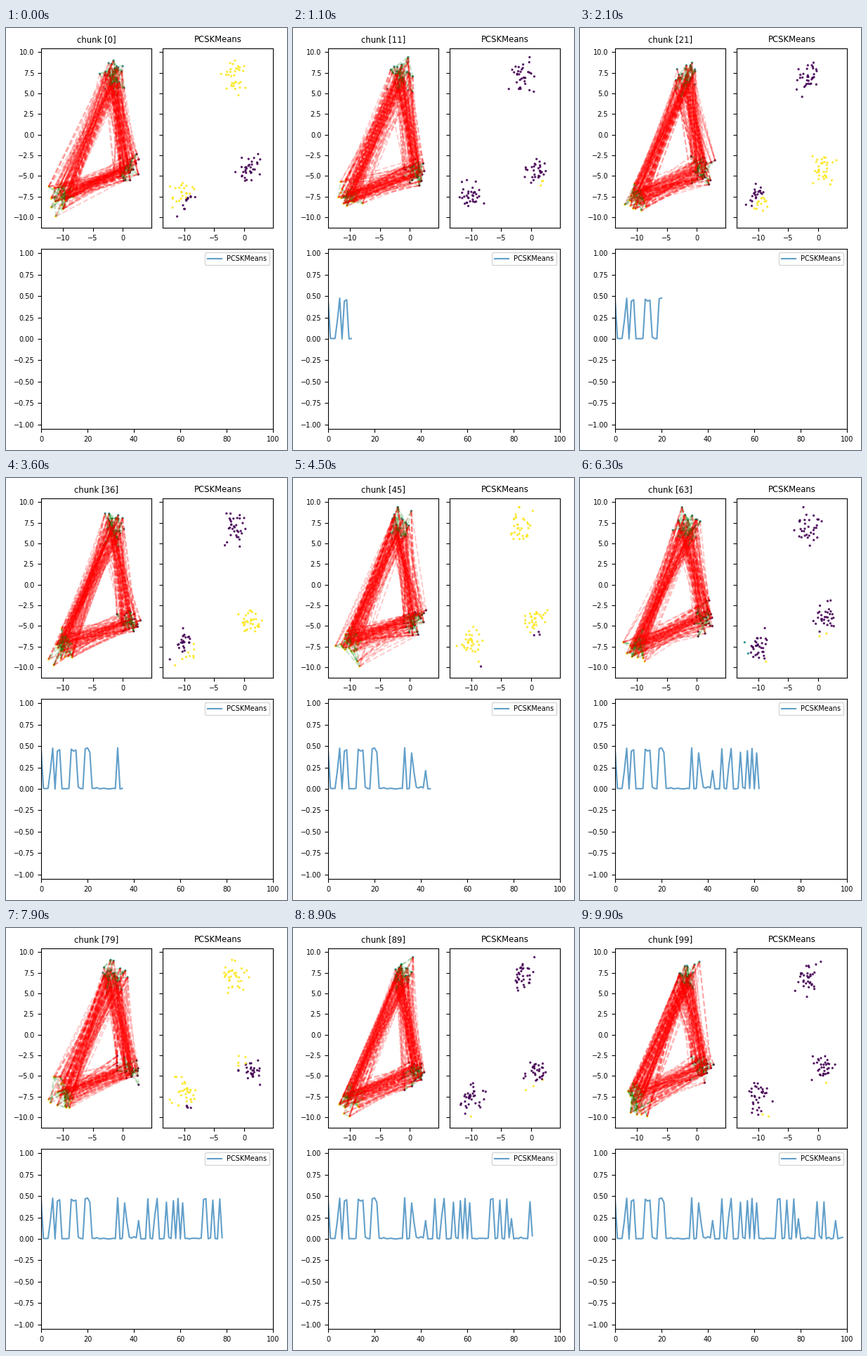
Recreate the animation shown at these times as a matplotlib script. Size 400 by 600 pixels, loop 10000 ms.

```python
import numpy as np
import matplotlib.pyplot as plt
from matplotlib.animation import FuncAnimation
from matplotlib.collections import LineCollection

plt.rcParams.update({"font.size": 7, "font.family": "DejaVu Sans"})

CHUNKS, LINKS = 100, 500
CENTERS = np.array([(0.85, -4.3), (-1.6, 7.0), (-10.0, -7.5)])
TRUTH = np.repeat([0, 1, 2], [33, 33, 34])

# Chunks that score well and chunks that score halfway; the rest stay near zero.
GOOD = [0, 5, 7, 8, 13, 14, 15, 19, 20, 21, 33, 36, 46, 50, 54, 57, 59, 61,
        70, 71, 74, 77, 87, 90]
HALF = [4, 37, 42, 49, 79, 95]


def make_scores():
    rng = np.random.default_rng(7)
    scores = np.minimum(rng.exponential(.007, CHUNKS), .04)
    scores[GOOD] = rng.uniform(.42, .485, len(GOOD))
    scores[HALF] = rng.uniform(.18, .28, len(HALF))
    return scores


def make_points(rng):
    noise = np.clip(rng.normal(size=(len(TRUTH), 2)), -2.4, 2.4)
    return CENTERS[TRUTH] + noise


def predict(n, pts, rng):
    """Split by a slanted line that shaves off fewer points as scores drop."""
    major, minor = (2, 0) if n % 13 < 7 else (0, 2)
    tilt = np.radians(20 + 30 * score[n])
    x, y = pts.T
    edge = -9.6 + 4.5 * score[n] + np.tan(tilt) * (x + 9.5)
    labels = np.where(y < edge, minor, major)
    if rng.random() < .3:
        labels[x < -11.4] = 1
    return labels


def dots(ax, name):
    ax.set(xlim=(-13.62, 4.82), ylim=(-11.28, 10.48),
           xticks=[-10, -5, 0], yticks=np.arange(-10, 10.1, 2.5))
    points = ax.scatter(np.zeros(len(TRUTH)), np.zeros(len(TRUTH)), s=2,
                        c=TRUTH, cmap="viridis", vmin=0, vmax=2, alpha=.8)
    return points, ax.set_title(name)


score = make_scores()
fig = plt.figure(figsize=(4, 6), dpi=100)
chunk_ax = fig.add_subplot(221)
pred_ax = fig.add_subplot(222, sharey=chunk_ax)
score_ax = fig.add_subplot(212)

chunk_dots, title = dots(chunk_ax, "chunk [0]")
pred_dots, _ = dots(pred_ax, "PCSKMeans")
pred_ax.tick_params(labelleft=False)

links = LineCollection([], linestyles="--", linewidths=1.5, alpha=.2, zorder=2)
chunk_ax.add_collection(links, autolim=False)

curve, = score_ax.plot([], [], color="C0", alpha=.7, label="PCSKMeans")
score_ax.set(xlim=(0, 100), ylim=(-1.05, 1.05),
             yticks=np.arange(-1, 1.01, .25))
score_ax.legend(loc="upper right")
fig.tight_layout()


def update(n):
    rng = np.random.default_rng(n)
    pts = make_points(rng)
    i, j = rng.integers(0, len(pts), (2, LINKS))
    links.set_segments(np.stack([pts[i], pts[j]], axis=1))
    links.set_color(np.where(TRUTH[i] == TRUTH[j], "g", "r").tolist())

    chunk_dots.set_offsets(pts)
    pred_dots.set_offsets(pts)
    pred_dots.set_array(predict(n, pts, rng))
    curve.set_data(np.arange(n), score[:n])
    title.set_text(f"chunk [{n}]")
    return links, chunk_dots, pred_dots, curve, title


anim = FuncAnimation(fig, update, frames=CHUNKS, interval=100,
                     init_func=lambda: update(0), repeat=True, repeat_delay=0)
plt.show()
```
